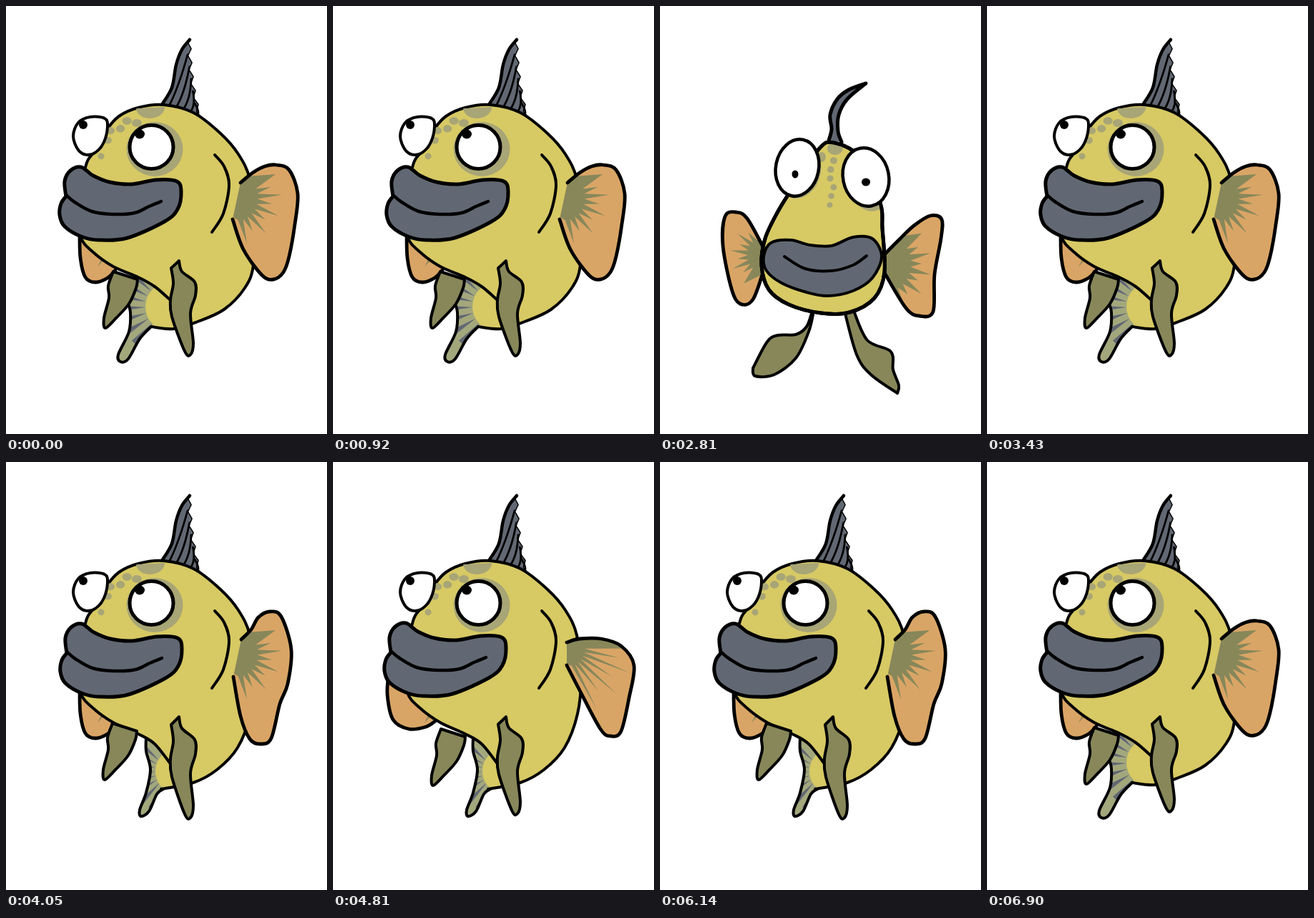
An HTML page with a canvas for the animation above (7000 ms loop, 449 px wide and 598 px high).

```html
<!DOCTYPE html>
<html lang="en">
<head>
<meta charset="utf-8">
<title>Fish</title>
<style>
html, body { margin: 0; width: 100%; height: 100%; overflow: hidden; background: #fff }
canvas { display: block }
</style>
</head>
<body>
<canvas id="stage" width="449" height="598"></canvas>
<script>
const g = document.getElementById('stage').getContext('2d');
const YELLOW = '#d7c964', SLATE = '#626873', OLIVE = '#87875a', ORANGE = '#d9a566',
      SPOT = '#a8a576', TAIL = '#a3a77c', WHITE = '#fff', BLACK = '#000';
const polar = (x, y, r, deg) => [x + r * Math.cos(deg * Math.PI / 180), y + r * Math.sin(deg * Math.PI / 180)];
const times = (n, f) => { for (let i = 0; i < n; i++) f(i, i / (n - 1)); };

// Spline through key points; "/" makes a corner, a final "z" closes smoothly.
function trace(text) {
  const loop = text.endsWith('z');
  let last;
  g.beginPath();
  for (const part of text.replace('z', '').split('/')) {
    const p = part.match(/\S+ \S+/g).map(pair => pair.split(' ').map(Number));
    if (last) p.unshift(last); else g.moveTo(...p[0]);
    const n = p.length;
    const at = i => loop ? p[(i + n) % n] : p[Math.max(0, Math.min(n - 1, i))];
    times(loop ? n : n - 1, i => {
      const [a, b, c, d] = [at(i - 1), at(i), at(i + 1), at(i + 2)];
      g.bezierCurveTo(b[0] + (c[0] - a[0]) / 6, b[1] + (c[1] - a[1]) / 6,
        c[0] - (d[0] - b[0]) / 6, c[1] - (d[1] - b[1]) / 6, ...c);
    });
    last = p[n - 1];
  }
}

function paint(fill, width) {
  if (fill) { g.fillStyle = fill; g.fill(); }
  if (width) { g.lineWidth = width; g.stroke(); }
}

function stretch([x, y, sx, sy]) {
  g.translate(x, y); g.scale(sx, sy); g.translate(-x, -y);
}

// The outline is stretched, its line weight is not.
function shape(text, fill, width = 4, size) {
  g.save();
  if (size) stretch(size);
  trace(text);
  g.restore();
  paint(fill, width);
}

function inside(text, size, detail) {
  g.save();
  if (size) stretch(size);
  trace(text);
  g.clip();
  detail();
  g.restore();
}

function shifted([dx, dy], detail) {
  g.save();
  g.translate(dx, dy);
  detail();
  g.restore();
}

function oval(x, y, rx, ry, fill, width = 0, turn = 0) {
  g.beginPath();
  g.ellipse(x, y, rx, ry, turn, 0, 7);
  paint(fill, width);
}

// Star of n rays around a fin's root
function fan([x, y, from, to, n, length, inner]) {
  const gap = (to - from) / (n - 1);
  g.beginPath();
  g.moveTo(...polar(x, y, length * inner, from - 90));
  times(n, i => {
    g.lineTo(...polar(x, y, length * (i % 2 ? .8 : 1), from + gap * i));
    g.lineTo(...polar(x, y, length * inner, from + gap * (i + .5)));
  });
  g.lineTo(...polar(x, y, length * inner, to + 90));
  paint(OLIVE);
}

function fin(text, star, size) {
  shape(text, ORANGE, 0, size);
  inside(text, size, () => fan(star));
  shape(text, null, 4.8, size);
}

function tail({ tail, patch: [x, y, rx, ry] }) {
  shape(tail, TAIL, 0);
  inside(tail, null, () => {
    times(8, i => {
      const deg = 118 + 15 * i;
      g.beginPath();
      g.moveTo(...polar(x, y, rx, deg));
      g.lineTo(...polar(x, y, rx + 38, deg - 3.5));
      g.lineTo(...polar(x, y, rx + 38, deg + 3.5));
      paint(SLATE);
    });
    oval(x, y, rx, ry, YELLOW);
  });
  shape(tail, null);
}

function dorsal() {
  const edge = '218 138 232 114 238 82 246 61 257 47';
  trace(edge);
  times(12, (i, u) => g.lineTo(256 + 15 * u * u + (i % 2 ? 3 : -2), 50 + 107 * u));
  paint(SLATE, 1.5);
  shape(edge, null, 4.5);
  times(5, i => {
    const x = 228 + 9 * i, y = 140 + 3.5 * i, endY = 68 + 17 * i;
    g.beginPath();
    g.moveTo(x, y);
    g.quadraticCurveTo(x + 14 - i, (y + endY) / 2 + 8, 254 + 2.5 * i, endY);
    paint(null, 2.8);
  });
}

const BACK_LINE = ' 347 300 341 242 325 207 300 178 262 149 220 138 185 142 158 154 140 174 122 205 112 222 100 280 104 322 122 344 150 364 ';
const FAR_FIN = '103 315 104 352 111 379 125 386 142 380 153 369';
const FAR_LEG = '149 365 / 142 385 143 402 136 430 138 444 153 430 171 410 181 388 183 376 / 149 365';
const LEG = '242 356 / 246 372 264 388 265 408 258 435 262 480 258 497 250 492 232 440 230 415 234 390 231 367 / 242 356';
const LIPS = '84 266 82 245 90 230 105 225 122 237 145 246 175 249 210 243 239 245 245 260 240 284 222 301 170 324 130 327 105 322 82 308 75 292 77 276 84 266';
const SMILE = '84 264 96 274 120 287 150 291 180 289 200 280 217 273';
const STAR = [320, 268, -30, 75, 9, 66, .48];

const MID = {
  lips: [0, 0], farLeg: [1, 6], legLength: .93,
  tail: '184 378 / 176 392 170 410 174 428 172 455 157 487 160 497 171 493 187 465 203 448 / 235 445 / 229 405',
  patch: [226, 420, 31, 33],
  body: '203 448 235 451 268 441 305 424 334 394 346 362' + BACK_LINE + '185 379 208 392 229 410',
  farFin: FAR_FIN,
  fin: '328 247 345 233 362 224 378 222 396 229 408 262 404 305 396 350 388 372 374 382 358 376 332 340 317 298',
  star: STAR
};

const UP = {
  ...MID,
  lips: [1, 1], farLeg: [0, 0], legLength: 1,
  tail: '196 385 / 196 404 202 430 196 462 187 486 189 495 200 488 211 464 220 457 / 238 440 / 225 395',
  patch: [230, 432, 21, 27],
  body: '217 457 262 448 295 430 324 399 342 352' + BACK_LINE + '185 380 208 394 231 423',
  fin: '329 248 343 234 353 217 369 209 385 216 399 262 394 310 383 338 371 386 356 394 341 387 328 355 318 300'
};

const OUT = {
  ...UP,
  lips: [-3, 0], farLeg: [2, 8], legLength: .96,
  farFin: '78 295 76 325 84 360 106 373 130 370 143 362',
  fin: '327 252 345 247 375 247 403 257 421 284 414 330 403 376 389 383 374 373 344 317 327 284',
  star: [322, 257, 2, 62, 7, 100, .3]
};

const POSES = [MID, UP, OUT];

function side(p) {
  tail(p);
  fin(p.farFin, [145, 335, 120, 170, 3, 34, .2]);
  dorsal();
  shape(p.body, YELLOW);
  shifted(p.farLeg, () => shape(FAR_LEG, OLIVE));

  times(7, (i, u) => {
    const [x, y] = polar(190, 221, i % 2 ? 64 : 58, 263 - 72 * u);
    oval(x, y, 7 - 2.5 * u, 5.5 - u, SPOT);
  });
  g.beginPath();
  g.ellipse(202, 142, 20, 15, -.06, 0, Math.PI);
  paint(SPOT);

  fin(p.fin, p.star);
  shape('292 208 305 224 312 250 304 290 288 316', null);
  shape(LEG, OLIVE, 4, [242, 356, 1, p.legLength]);

  oval(208, 200, 39.5, 38, SPOT);
  shape('94 182 101 163 118 155 138 157 142 168 137 190 126 204 113 208 101 201z', WHITE);
  oval(108, 166, 6, 6, BLACK);
  oval(203.5, 197, 30.5, 30.5, WHITE, 5);
  oval(187, 179, 7, 6.5, BLACK);

  shifted(p.lips, () => {
    shape(LIPS, SLATE, 5);
    shape(SMILE, null, 4.5);
  });
}

// Front view; reach 0..1 spreads the fins and lowers the legs
function front(reach) {
  const left = [144, 350, 1 + .34 * reach, 1], right = [315, 355, 1 + .25 * reach, 1],
        legs = [240, 428, 1, 1 + .12 * reach];
  shape('213 426 / 205 448 190 459 165 460 150 469 130 506 / 133 517 160 515 190 492 208 455 215 426', OLIVE, 4, legs);
  shape('258 426 / 275 487 295 515 332 541 / 334 530 326 508 323 483 290 467 271 426', OLIVE, 4, legs);
  fin('146 340 122 297 106 288 91 294 88 335 100 395 112 416 130 410 146 366', [148, 348, 128, 232, 8, 50, .5], left);
  fin('313 348 335 326 355 307 378 293 394 298 393 325 384 375 382 427 363 433 344 422 313 371',
    [310, 360, -37, 62, 9, 70, .58], right);
  shape('236 188 240 172 238 152 248 130 264 117 288 108 / 262 130 250 152 249 175 254 190', SLATE, 5);

  const body = '243 191 222 200 185 255 165 287 147 325 142 362 152 396 180 417 225 429 265 428 300 408 314 372 311 310 308 275 280 212z';
  shape(body, YELLOW, 5);
  inside(body, null, () => {
    oval(193, 229, 32, 40, SPOT, 0, .2);
    oval(293, 246, 31, 41, SPOT, 0, -.2);
    oval(245, 199, 11, 9, SPOT);
    oval(226, 211, 6, 7, SPOT);
    times(6, (i, u) => oval(240 + 3 * Math.cos(2 * i), 216 + 62 * u, 5 - u, 4.8 - u, SPOT));
  });
  shape(body, null, 5);

  oval(192, 226, 30, 40, WHITE, 4.5, .2);
  oval(288, 239, 32, 41, WHITE, 4.5, -.2);
  oval(189, 235, 4.5, 5.5, BLACK);
  oval(288, 246, 6, 5.5, BLACK);
  shape('145 350 155 331 183 327 210 334 240 335 270 323 297 325 310 350 297 380 270 398 235 405 205 400 170 387 149 370z', SLATE);
  shape('174 350 203 367 240 370 270 362 289 349', null);
}

// Three drawings repeat at a steady step, turning to the front in between.
const LOOP = 7000, STEP = 755 / 13, LAST = 118, TURN = 33, RETURN = 50;

function draw(now) {
  const i = Math.min(LAST, 1 + Math.floor((now % LOOP - 50) / STEP));
  g.fillStyle = WHITE;
  g.fillRect(0, 0, 449, 598);
  g.strokeStyle = BLACK;
  g.lineCap = g.lineJoin = 'round';
  if (i === LAST) side(MID);
  else if (i >= TURN && i < RETURN) front((i - TURN) % 3 / 2);
  else side(POSES[(i < TURN ? i : i - RETURN) % 3]);
}

const begin = performance.now();
(function tick() {
  draw(performance.now() - begin);
  requestAnimationFrame(tick);
})();
</script>
</body>
</html>
```
